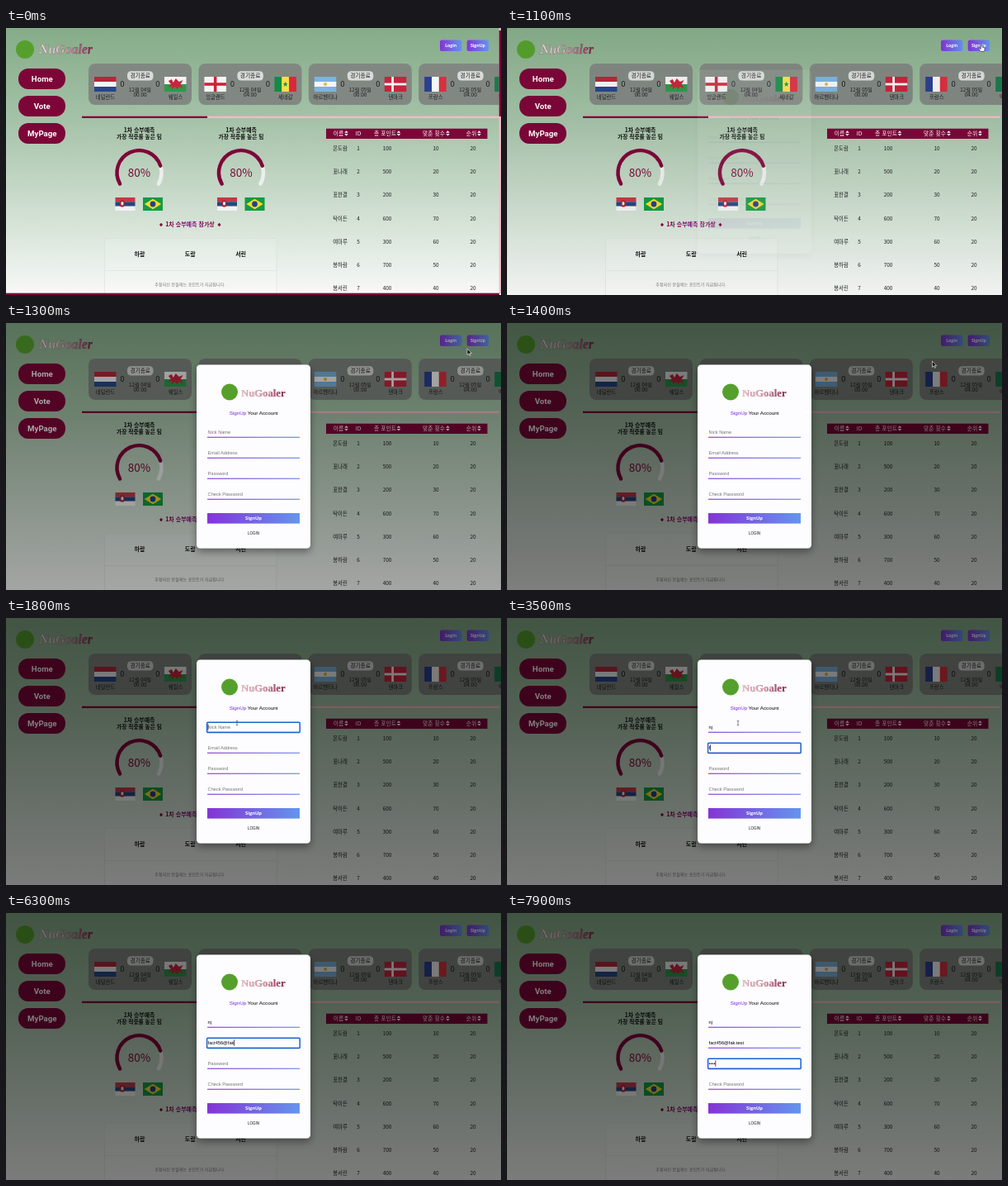
An HTML page that plays this animation: 600 px wide and 323 px high, repeating every 8 s.

```html
<!DOCTYPE html>
<html lang="ko">
<head>
<meta charset="utf-8">
<title>Match vote</title>
<style>
html, body { margin: 0; width: 100%; height: 100%; overflow: hidden; background: #fff; }
svg { display: block; width: 100vw; height: 100vh; }
text { font-family: 'Noto Sans CJK KR', 'Noto Sans CJK', 'Noto Sans', sans-serif; white-space: pre; }
.mid { text-anchor: middle; }
.bold { font-weight: 700; }
.menu { font-family: Roboto, sans-serif; font-weight: 600; }
.form { font-family: 'Liberation Sans', Arial, sans-serif; }
.ui { font-family: 'Open Sans', sans-serif; font-weight: 700; }
.brand { font-family: 'Liberation Serif', serif; font-weight: 700; }
</style>
</head>
<body>
<svg id="stage" viewBox="0 0 600 323" preserveAspectRatio="none">
  <defs>
    <linearGradient id="sky" x2="0" y2="1">
      <stop stop-color="#85ac88"/><stop offset=".33" stop-color="#a3c1a6"/><stop offset="1" stop-color="#f7f9f7"/>
    </linearGradient>
    <linearGradient id="violet"><stop stop-color="#8434d6"/><stop offset="1" stop-color="#6495ed"/></linearGradient>
    <linearGradient id="rule" gradientUnits="userSpaceOnUse" x1="244" x2="356" y1="0" y2="0">
      <stop stop-color="#8434d6"/><stop offset="1" stop-color="#6a80ea"/>
    </linearGradient>
    <linearGradient id="brand"><stop stop-color="#efe6e6"/><stop offset=".45" stop-color="#d9b3be"/><stop offset="1" stop-color="#84103f"/></linearGradient>
    <linearGradient id="brandPink"><stop stop-color="#f3c9cf"/><stop offset=".5" stop-color="#d79aa8"/><stop offset="1" stop-color="#84103f"/></linearGradient>
    <linearGradient id="award"><stop stop-color="#7d0638"/><stop offset=".5" stop-color="#8a0a86"/><stop offset="1" stop-color="#7d0638"/></linearGradient>
    <filter id="shadow" x="-20%" y="-20%" width="140%" height="140%">
      <feDropShadow dx="0" dy="4" stdDeviation="5" flood-opacity=".4"/>
    </filter>
  </defs>
  <g id="page"></g>
  <g id="bars"></g>
  <rect id="shade" width="600" height="323"/>
  <g id="modal"></g>
  <g id="pointer"></g>
</svg>
<script>
const WINE = '#7d0638', PINK = '#f4b9c5';
const $ = id => document.getElementById(id);

const rect = (x, y, w, h, fill, r = 0, extra = '') =>
  `<rect x="${x}" y="${y}" width="${w}" height="${h}" rx="${r}" fill="${fill}" ${extra}/>`;
const circle = (x, y, r, fill) => `<circle cx="${x}" cy="${y}" r="${r}" fill="${fill}"/>`;
const path = (d, fill) => `<path d="${d}" fill="${fill}"/>`;
const text = (s, x, y, size, fill = '#1c1c1c', cls = 'mid', extra = '') =>
  `<text x="${x}" y="${y}" font-size="${size}" fill="${fill}" class="${cls}" ${extra}>${s}</text>`;

// Flags are drawn on a 27 x 18 grid.
const rows = colors => colors.map((c, i) => rect(0, i * 18 / colors.length, 27, 18 / colors.length, c)).join('');
const cols = colors => colors.map((c, i) => rect(i * 27 / colors.length, 0, 27 / colors.length, 18, c)).join('');
const cross = (ground, color, x, w) =>
  rect(0, 0, 27, 18, ground) + rect(x - w / 2, 0, w, 18, color) + rect(0, 9 - w / 2, 27, w, color);
const flags = {
  netherlands: rows(['#b3283a', '#f4f4f4', '#27478c']),
  wales: rows(['#f2f2f2', '#2c9a4b']) +
    path('M5 5L9 3L11 7L14 2L18 6L23 4L20 9L23 14L18 12L16 15L13 12L9 15L9 11L5 13L8 9Z', '#c8263c'),
  england: cross('#f4f4f4', '#cf2338', 13.5, 3.6),
  senegal: cols(['#148a45', '#f5e04a', '#d8283c']) + path('M13.5 5.5L15.5 12L10.5 8H16.5L11.5 12Z', '#148a45'),
  argentina: rows(['#7cb4e0', '#f5f5f5', '#7cb4e0']) + circle(13.5, 9, 2, '#e8b43a'),
  denmark: cross('#c8243c', '#f6f6f6', 10, 2.8),
  france: cols(['#2a3f8f', '#f5f5f5', '#d8303f']),
  mexico: cols(['#1b7a4c', '#f4f4f4', '#c8283c']),
  serbia: rows(['#c23a44', '#27457f', '#f2f2f2']) + rect(6.5, 4, 6, 9, '#b0202e', 2) + rect(8, 6, 3, 4.5, '#eee', 1),
  brazil: rect(0, 0, 27, 18, '#149a45') + path('M13.5 2L25 9L13.5 16L2 9Z', '#f6dc2c') + circle(13.5, 9, 3.8, '#24408e')
};
const flag = (name, x, y, w, h) =>
  `<g transform="translate(${x} ${y}) scale(${w / 27} ${h / 18})">${flags[name]}</g>`;

const menuItem = (label, i) =>
  rect(15, 49 + i * 33, 57, 25, WINE, 12) + text(label, 43.8, 65.2 + i * 33, 9.7, '#fff', 'mid menu');

const headButton = (label, x) =>
  rect(x, 14.6, 26.5, 13.4, 'url(#violet)', 2.5) + text(label, x + 13.2, 23.3, 5.2, '#fff', 'mid ui');

function matchCard([home, homeName, away, awayName, day, hour], i) {
  const x = 100 + i * 133.4;
  return rect(x, 43, 125, 50, '#818882', 8) +
    rect(x + 47, 52.3, 31.5, 11.2, '#d9dcd9', 4.5) + text('경기종료', x + 62.7, 60.4, 6.7) +
    flag(home, x + 7, 59, 26.5, 18) + flag(away, x + 92, 59, 26.5, 18) +
    text('0', x + 41, 71.3, 9.5) + text('0', x + 84, 71.3, 9.5) +
    text(`12월 ${day}일`, x + 62.5, 76.7, 6.2) + text(hour, x + 62.5, 82.9, 6.4) +
    text(homeName, x + 20.5, 85.6, 6.4) + text(awayName, x + 105.5, 85.6, 6.4);
}

function gauge(cx) {
  const cy = 175, r = 27;
  const at = deg => {
    const a = deg * Math.PI / 180;
    return `${cx + r * Math.cos(a)} ${cy - r * Math.sin(a)}`;
  };
  const arc = (to, color) =>
    `<path d="M${at(210)}A${r} ${r} 0 1 1 ${at(to)}" fill="none" stroke="${color}" stroke-width="4.5" stroke-linecap="round"/>`;
  return text('1차 승부예측', cx, 126, 6.9, '#111', 'mid bold') +
    text('가장 적중률 높은 팀', cx, 134.4, 6.7, '#111', 'mid bold') +
    arc(-30, '#eceeec') + arc(18, WINE) + text('80%', cx, 179.5, 13.5, WINE) +
    flag('serbia', cx - 29, 205, 24, 16) + flag('brazil', cx + 4.5, 205, 24, 16);
}

const sorter = x => path(`M${x - 2.3} 126.8h4.6l-2.3-2.6zM${x - 2.3} 128h4.6l-2.3 2.6z`, '#fff');

function ranking() {
  const columns = [405, 427, 462, 521, 566];
  const people = ['온도람', '표나래', '표한결', '탁이든', '여마루', '봉하람', '봉서린'];
  const points = [100, 500, 200, 600, 300, 700, 400];
  const hits = [10, 20, 30, 70, 60, 50, 40];
  const heads = [['이름', 403], ['ID', 427], ['총 포인트', 459.5], ['맞춘 횟수', 518.5], ['순위', 564]];
  return rect(388, 121.7, 195.5, 12.3, WINE) +
    heads.map(([s, x]) => text(s, x, 130.2, 6.8, '#fff')).join('') +
    [412.5, 476, 535.5, 573.5].map(sorter).join('') +
    people.map((name, i) => [name, i + 1, points[i], hits[i], 20]
      .map((v, c) => text(v, columns[c], 148 + i * 28.2, 6.4)).join('')).join('');
}

const matches = [
  ['netherlands', '네덜란드', 'wales', '웨일스', '04', '00:00'],
  ['england', '잉글랜드', 'senegal', '세네갈', '04', '04:00'],
  ['argentina', '아르헨티나', 'denmark', '덴마크', '05', '00:00'],
  ['france', '프랑스', 'mexico', '멕시코', '05', '04:00']
];

$('page').innerHTML =
  rect(0, 0, 600, 323, 'url(#sky)') +
  circle(23, 26, 11, '#55a02c') +
  text('NuGoaler', 40, 31, 15.8, 'url(#brand)', 'brand', 'font-style="italic" stroke="#6b4a55" stroke-width=".25"') +
  headButton('Login', 526) + headButton('SignUp', 558.7) +
  ['Home', 'Vote', 'MyPage'].map(menuItem).join('') +
  matches.map(matchCard).join('') +
  rect(92, 106.7, 506, 2.3, PINK) + rect(92, 106.7, 152, 2.3, WINE) +
  gauge(161.5) + gauge(285) +
  text('1차 승부예측 참가상', 223, 240.4, 7, 'url(#award)', 'mid bold') +
  path('M186 238l2-2.2 2 2.2-2 2.2zM256.5 238l2-2.2 2 2.2-2 2.2z', WINE) +
  rect(119.5, 254.5, 208.5, 80, 'rgba(255,255,255,.12)', 0, 'stroke="#d3dcd3" stroke-width=".5"') +
  rect(120, 293.3, 208, .6, '#d8dfd8') +
  ['하람', '도람', '서린'].map((s, i) => text(s, 162 + i * 61.3, 276.3, 7, '#111', 'mid bold')).join('') +
  text('추첨되신 분들께는 포인트가 지급됩니다.', 223, 312, 5.1, '#7c7c7c') +
  ranking();

$('bars').innerHTML = rect(597.7, 0, 2.3, 321, PINK) + rect(597.7, 3, 2.3, 104, WINE) + rect(0, 320.7, 598, 2.3, WINE);

const fieldTop = i => 126 + i * 25;
const hints = ['Nick Name', 'Email Address', 'Password', 'Check Password'];

$('modal').innerHTML =
  rect(231, 50.5, 138, 222, '#fdfcfe', 4.5, 'filter="url(#shadow)"') +
  circle(271, 83.5, 10, '#55a02c') +
  text('NuGoaler', 285, 89, 12.7, 'url(#brandPink)', 'brand', 'stroke="#8a5a68" stroke-width=".2"') +
  text('<tspan fill="#7226e0">SignUp</tspan> Your Account', 300, 111.1, 6.25, '#000', 'mid form') +
  hints.map((_, i) => rect(244, fieldTop(i) + 11.7, 112, 1.1, 'url(#rule)') +
    `<text id="field${i}" x="244.6" y="${fieldTop(i) + 8}" font-size="5.65" class="form"></text>`).join('') +
  rect(243.6, 0, 112.6, 12.2, '#fff', 1, 'id="focus" stroke="#1b62cf" stroke-width="1.5" fill-opacity="0"') +
  rect(0, 0, .7, 7.4, '#000', 0, 'id="caret"') +
  rect(244, 230, 112, 12.6, 'url(#violet)') + text('SignUp', 300, 238.4, 5.8, '#fff', 'mid ui') +
  text('LOGIN', 300, 255.8, 4.5, '#111', 'mid form');

const shapes = {
  arrow: '<path d="M0 0V7.5L1.8 5.9L3 8.5L4.1 8L3 5.5H5.3Z" fill="#111" stroke="#fff" stroke-width=".6"/>',
  hand: '<path d="M-.8 0q.8-.8 1.6 0V3L4 3.8V6.5L3 8.5H-1L-3 5.4L-2.2 4.6L-.8 5.6Z" fill="#fff" stroke="#222" stroke-width=".6"/>',
  beam: '<path d="M-1.3-2.8Q0-2.8 0-2V2Q0 2.8-1.3 2.8M1.3-2.8Q0-2.8 0-2M0 2Q0 2.8 1.3 2.8" fill="none" stroke="#456" stroke-width=".7"/>'
};

// Times at which each character appears, per field.
const typed = [
  { value: 'nj', keys: [2400, 2600] },
  { value: 'fact456@fak.test', keys: [3500, 3800, 3900, 4000, 4600, 4700, 4800, 5000, 6000, 6100, 6300, 6400, 6500, 6700, 6800, 7000] },
  { value: '••••', keys: [7500, 7600, 7700, 7900] },
  { value: '', keys: [] }
];
const caretOff = [[2200, 2400], [3100, 3500], [5500, 6000]];

// Pointer stops: time, x, y.
const stops = [[200, 600, 130], [900, 575, 20], [1100, 575, 20], [1300, 559, 31], [1700, 280, 127], [3800, 280, 127]];

const clamp = v => Math.max(0, Math.min(1, v));

function drawPointer(t) {
  const i = stops.findIndex(s => s[0] > t);
  if (i < 1) { $('pointer').innerHTML = ''; return; }
  const [t0, x0, y0] = stops[i - 1], [t1, x1, y1] = stops[i];
  const p = (t - t0) / (t1 - t0), k = p * p * (3 - 2 * p);
  const shape = t >= 1700 ? 'beam' : t >= 900 && t < 1200 ? 'hand' : 'arrow';
  $('pointer').setAttribute('transform', `translate(${x0 + (x1 - x0) * k} ${y0 + (y1 - y0) * k})`);
  $('pointer').innerHTML = shapes[shape];
}

function drawForm(t) {
  const active = t < 1800 ? -1 : t < 3500 ? 0 : t < 7100 ? 1 : 2;
  typed.forEach(({ value, keys }, i) => {
    const shown = value.slice(0, keys.filter(k => k <= t).length);
    const field = $('field' + i);
    field.textContent = shown || hints[i];
    field.setAttribute('fill', shown ? '#000' : '#757575');
    if (i === active) {
      $('caret').setAttribute('x', 244.6 + (shown ? field.getComputedTextLength() : 0));
      $('caret').setAttribute('y', fieldTop(i) + 2.3);
      $('focus').setAttribute('y', fieldTop(i) + .2);
    }
  });
  const blinkOff = caretOff.some(([a, b]) => t >= a && t < b);
  $('focus').style.display = active < 0 ? 'none' : '';
  $('caret').style.display = active < 0 || blinkOff ? 'none' : '';
}

function draw(now) {
  const t = Math.floor(now % 8000 / 100) * 100;
  $('bars').style.display = t < 1000 ? '' : 'none';
  $('shade').setAttribute('opacity', clamp((t - 1085) / 320) * .5);
  $('modal').setAttribute('opacity', clamp((t - 1085) / 200));
  drawForm(t);
  drawPointer(t);
}

const start = performance.now();
function tick() {
  draw(performance.now() - start);
  requestAnimationFrame(tick);
}
tick();
</script>
</body>
</html>
```
